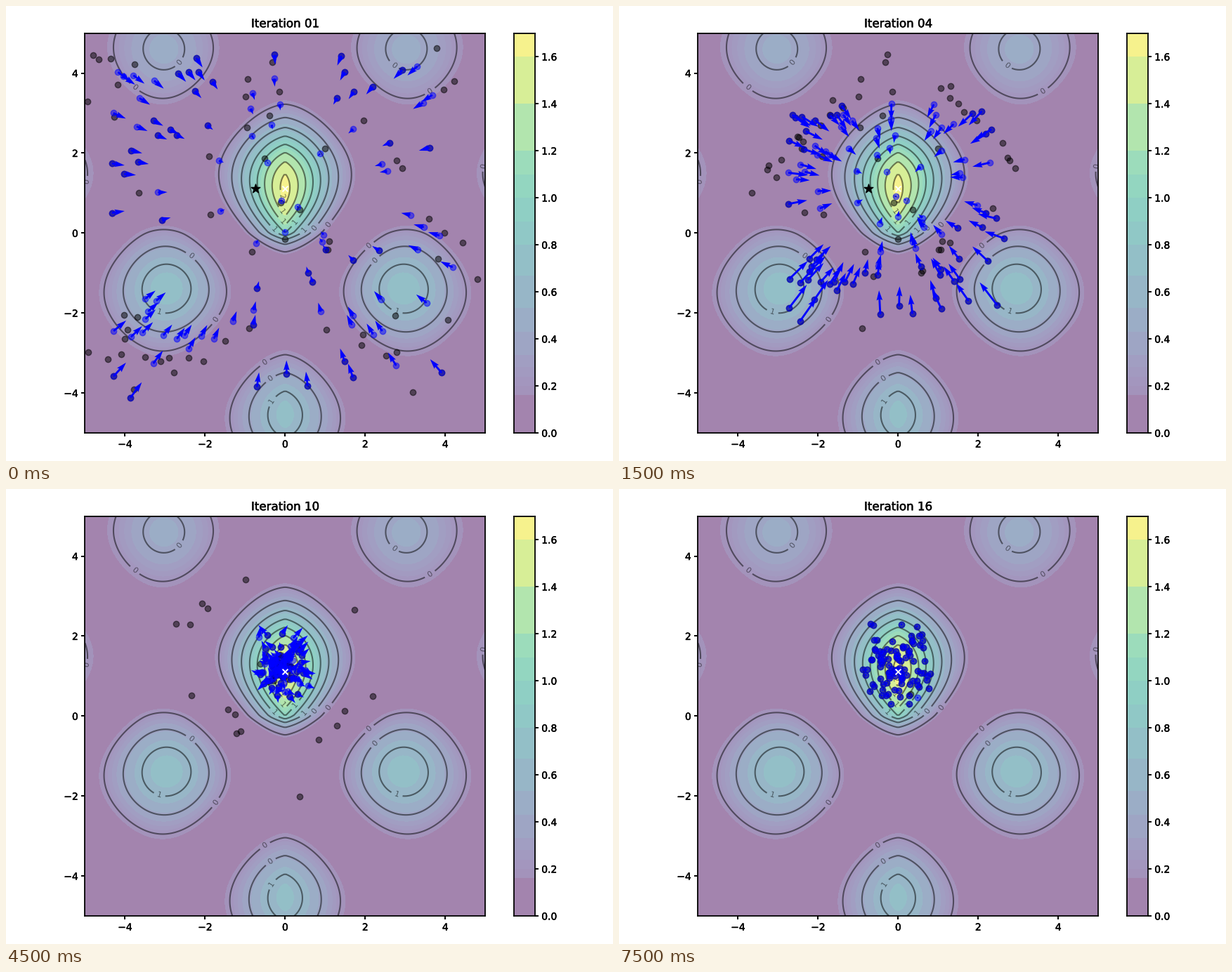
Write a matplotlib script that moves like this. It is 864x648 px and loops after 8000 ms.

```python
import numpy as np
import matplotlib.pyplot as plt
from matplotlib.animation import FuncAnimation
from matplotlib.patheffects import withStroke

W, H = 864, 648
FRAMES = 16
COUNT = 100
TOP = 1.7
GOAL = np.array([0, 1.11])
rng = np.random.default_rng(12)


def height(x, y):
    return (np.cos(x) + np.sin(y)) ** 2 / (1 + abs(x) + abs(y))


def distance(points):
    return np.hypot(*(points - GOAL).T)


start = rng.uniform(-5, 5, (COUNT, 2))
drift = rng.normal([-0.13, 0.05], 0.2, (COUNT, 2))


def place(k):
    """Fall in at a steady rate, overshoot a little, then hover."""
    pull = 0.87 * max(1 - 0.122 * k, -0.16)
    ramp = np.clip((k - 3) / 6, 0, 1)
    return GOAL + (start - GOAL) * pull + drift * ramp


def simulate():
    """Memories keep to the valleys at first, then move to the peak."""
    best = start
    for k in range(FRAMES):
        pos = place(k)
        if k < 8:
            lower = height(*pos.T) < height(*best.T)
            renew = lower | (distance(best) > max(7 - k, 3.4))
        else:
            renew = rng.random(COUNT) < 0.55
        best = np.where(renew[:, None], pos, best)
        speed = (place(k + 1) - pos) * (0.9 if k else 0.6)
        yield pos, best, speed


steps = list(simulate())

fig = plt.figure(figsize=(W / 100, H / 100), dpi=100, facecolor="white")
ax = fig.add_axes([112.4 / W, 40 / H, 569.8 / W, 569.4 / H])
cax = fig.add_axes([723 / W, 40 / H, 29.5 / W, 569.4 / H])
bold = [withStroke(linewidth=0.35, foreground="black")]

# Opaque half-tints keep the seams between bands clean
levels = np.array([0, .16, .2, .24, .28, .33, .43, .53, .67, .8, .9, 1, 1.1,
                   1.2, 1.4, 1.6, TOP])
mids = (levels[1:] + levels[:-1]) / 2
mids[0] = 0.04
tints = 0.5 + 0.5 * plt.get_cmap("viridis")(mids / TOP)[:, :3]

grid = np.linspace(-5, 5, 200)
X, Y = np.meshgrid(grid, grid)
Z = np.minimum(height(X, Y), TOP - 0.001)
ax.contourf(X, Y, Z, levels, colors=tints)
lines = ax.contour(X, Y, Z, np.arange(0.2, TOP, 0.2), colors="black",
                   alpha=0.5, linewidths=1.5)
ax.clabel(lines, inline=True, fontsize=8, fmt="%.0f")

cax.bar(0.5, np.diff(levels), 1, bottom=levels[:-1], color=tints, linewidth=0,
        antialiased=False)
cax.yaxis.tick_right()
cax.set(xticks=[], yticks=np.arange(0, TOP, 0.2), xlim=(0, 1), ylim=(0, TOP))
cax.yaxis.set_major_formatter("{x:.1f}")
ticks = range(-4, 5, 2)
ax.set(xlim=(-5, 5), ylim=(-5, 5), xticks=ticks, yticks=ticks)

for a in (ax, cax):
    a.tick_params(width=1.4)
    for s in a.spines.values():
        s.set_linewidth(1.3)
    for t in a.get_xticklabels() + a.get_yticklabels():
        t.set_path_effects(bold)

title = ax.set_title("Iteration 01", fontsize=12, path_effects=bold)
pos, best, speed = steps[0]
marks = ax.scatter(*best.T, c="black", alpha=0.5, zorder=3)
dots = ax.scatter(*pos.T, c="blue", alpha=0.5, zorder=4)
arrows = ax.quiver(*pos.T, *speed.T, color="blue", width=0.005, angles="xy",
                   scale_units="xy", scale=1, zorder=5)
star = ax.scatter([-0.75], [1.11], c="black", marker="*", s=90, zorder=3.5)
ax.scatter(*GOAL, c="white", marker="x", s=32, linewidths=1.4, zorder=6)


def update(k):
    pos, best, speed = steps[k]
    title.set_text(f"Iteration {k + 1:02d}")
    marks.set_offsets(best)
    dots.set_offsets(pos)
    arrows.set_offsets(pos)
    arrows.set_UVC(*speed.T)
    star.set_offsets([[-0.75, 1.11] if k < 4 else [0.24, 2.02]])
    star.set_visible(k < 6)
    return title, marks, dots, arrows, star


anim = FuncAnimation(fig, update, frames=FRAMES, interval=500, repeat=True,
                     repeat_delay=0, blit=False)
plt.show()
```
